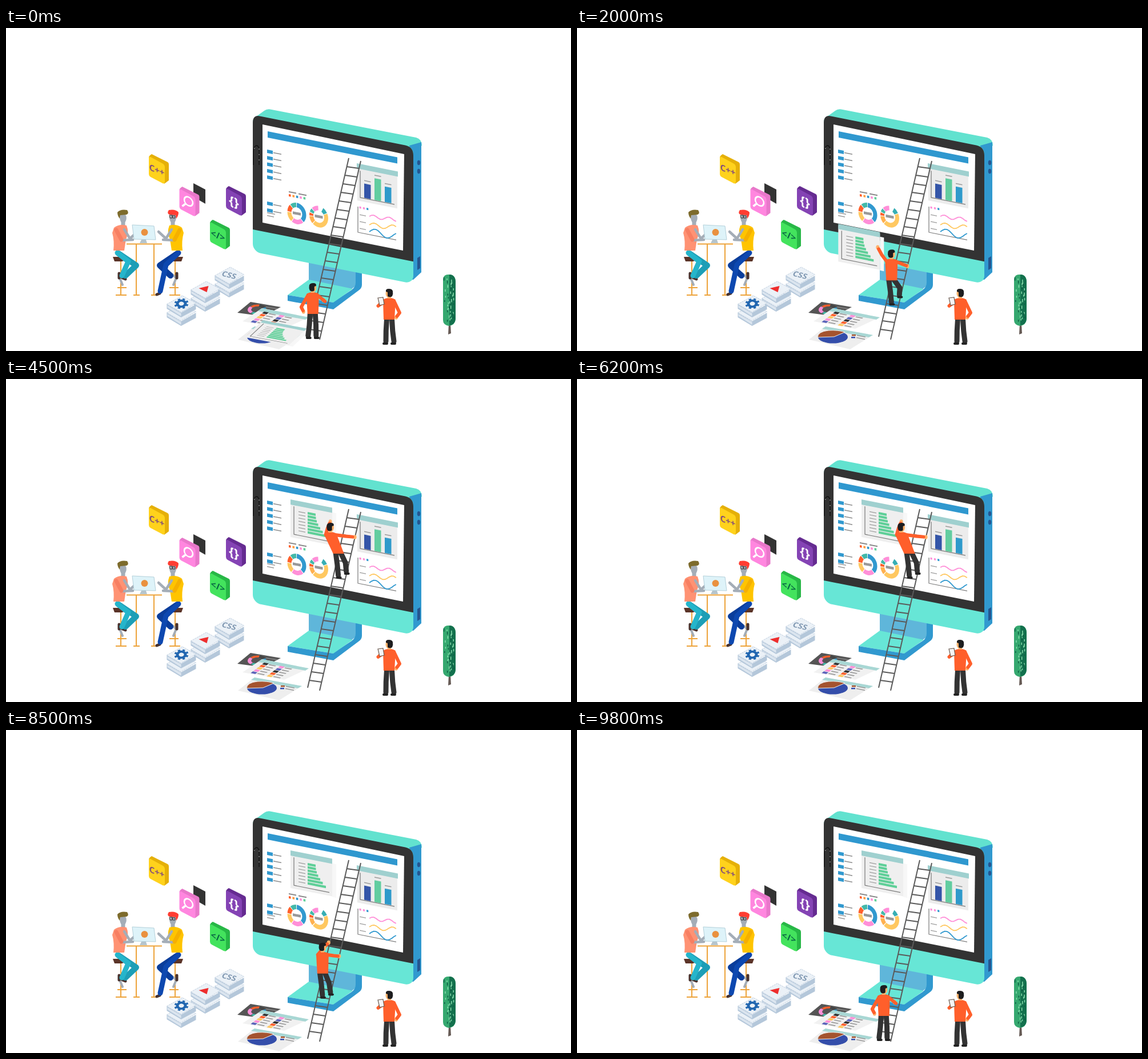
Write an HTML page that moves like this. It is 989 px wide and 566 px high and loops after 9.9 s.

```html
<!DOCTYPE html>
<html lang="en">
<head>
<meta charset="utf-8">
<title>Building a dashboard</title>
<style>
html, body { margin: 0; width: 100%; height: 100%; overflow: hidden; background: #fff; }
svg { display: block; width: 989px; height: 566px; font-family: "Open Sans", Arial, sans-serif; }
</style>
</head>
<body>
<svg id="stage" viewBox="0 0 989 566" xmlns="http://www.w3.org/2000/svg"></svg>
<script>
const LOOP = 9900, STEP = 100;
const TEAL = '#67e6d6', BLUE = '#3199cf', INK = '#333', ORANGE = '#ff5f2b', SKIN = '#ffb26b';
const PINK = '#ff8fd8', GOLD = '#ffc861', GREEN = '#5fcf98', GREY = '#a4adb7', PALE = '#9fd0cf';

const clamp = v => Math.min(1, Math.max(0, v));
const ramp = (t, from, to) => clamp((t - from) / (to - from));
const mix = (a, b, k) => a.map((v, i) => v + (b[i] - v) * k);
const range = (n, f) => Array.from({ length: n }, (_, i) => f(i)).join('');

const path = (d, fill, extra = '') => `<path d="${d}" fill="${fill}" ${extra}/>`;
const poly = (pts, fill, extra = '') => `<polygon points="${pts}" fill="${fill}" ${extra}/>`;
const line = (d, color, w = 1, extra = '') =>
  path(d, 'none', `stroke="${color}" stroke-width="${w}" stroke-linejoin="round" ${extra}`);
const limb = (color, w, ...pts) => line('M' + pts.join('L'), color, w, 'stroke-linecap="round"');
const rect = (x, y, w, h, fill, rx = 0) => `<rect x="${x}" y="${y}" width="${w}" height="${h}" rx="${rx}" fill="${fill}"/>`;
const oval = (x, y, rx, ry, fill) => `<ellipse cx="${x}" cy="${y}" rx="${rx}" ry="${ry}" fill="${fill}"/>`;
const group = (m, body) => `<g transform="${m}">${body}</g>`;
const iso = (x, y, body) => group(`matrix(1 .2 0 1 ${x} ${y})`, body);
const label = (s, size, fill) =>
  `<text y="${size / 3}" font-size="${size}" font-weight="700" text-anchor="middle" fill="${fill}">${s}</text>`;

// coloured ring; shares add up to 100 and start at the top
function ring(r, w, ...parts) {
  let at = 0, s = '';
  for (const [color, share] of parts) {
    s += `<circle r="${r}" fill="none" stroke="${color}" stroke-width="${w}" pathLength="100"
      stroke-dasharray="${share - 1.2} 101" stroke-dashoffset="${-at}" transform="rotate(-90)"/>`;
    at += share;
  }
  return s;
}

function monitor() {
  return poly('530,408 612,425 612,452 600,461 530,446', '#5fb6da')
    + path('M612 425L623 427V450Q623 456 617 460L573 493V480L605 459Q612 454 612 446Z', BLUE)
    + poly('530,441 607,457 573,481 493,468', TEAL)
    + poly('493,468 573,481 573,493 493,478', BLUE)
    + path('M434 158L452 145Q457 141 465 143L718 192Q728 195 728 206L713 216Z', '#62e2cf')
    + path('M706 206L727 200V428L713 441L700 440Z', BLUE)
    + iso(432, 151, rect(0, 0, 281, 241, TEAL, 14)
      + path('M0 202V15Q0 0 14 1H267Q281 1 281 16V202Z', INK))
    + poly('449,169 697,221 695,390 449,341', '#fff')
    + line('M433 240V216Q434 206 439 206Q443 207 443 215V240', '#111', 1.3)
    + line('M434 211H443V238', '#ddd', 1, 'stroke-dasharray="1.5 8"')
    + oval(722.5, 236, 2.7, 4.2, '#24558f') + oval(722.5, 251, 2.7, 4.2, '#24558f')
    + poly('720,403 725,400 725,421 720,424', '#24558f');
}

function screen() {
  const item = y => iso(457, y, rect(0, 0, 10, 6, BLUE) + rect(11, 2.5, 14, 1.5, '#8a8a8a'));
  const donut = (x, y, ...parts) => group(`matrix(1 .2 0 1.14 ${x} ${y})`,
    ring(13, 7, ...parts) + rect(-7, -2, 14, 4, '#999'));
  const bar = (x, top, color) => rect(x, top, 11.5, 58 - top, color) + rect(x, top - 6, 11.5, 1.5, '#999');
  const wave = (y, rise, amp, speed, color) => line('M' + Array.from({ length: 13 }, (_, i) =>
    `${636 + i * 3.9} ${(y + rise * i - amp * Math.sin(i * speed)).toFixed(1)}`).join('L'), color, 1.8);

  return iso(458, 181, rect(0, 0, 227, 11, '#2f98cf'))
    + range(5, i => item(213 + i * 11.3)) + range(2, i => item(304 + i * 12))
    + iso(457, 323, rect(0, 0, 14, 1.3, '#888') + rect(0, 5, 12, 1.3, '#888'))
    + iso(495, 286, rect(0, 0, 13, 2, '#888') + rect(17, 0, 14, 2, '#888')
      + range(5, i => rect(i * 6.4, 5, 3.6, 4, [ORANGE, '#ff9c42', BLUE, PINK, GREEN][i])))
    + donut(509, 325, [BLUE, 38], [PINK, 22], [GOLD, 16], [ORANGE, 12], ['#42b9a9', 12])
    + donut(547.5, 330.5, ['#fff', 8], ['#36aeb4', 10], [GOLD, 44], ['#ffb04f', 12], [ORANGE, 6], ['#42b9a9', 7], [PINK, 13])
    + iso(614, 237, rect(1, 5, 70, 60, '#ececec') + rect(0, 0, 72, 9, PALE) + line('M6 12V59H66', '#777', 1.2)
      + bar(13, 33, '#3455a8') + bar(31, 20, '#62cda0') + bar(49, 31, '#2f9acb'))
    + iso(616, 315, line('M0 -2V43H67', '#777', 1.2)
      + range(3, i => rect(2.5 + i * 6.3, -3, 3.2, 3.6, i < 2 ? PINK : BLUE) + rect(3, 11 + i * 12, 11, 1.2, '#999')))
    + wave(330, .5, 3, .9, PINK) + wave(345, .4, 4, .75, GOLD) + wave(357, .65, 6, .6, BLUE);
}

const rail = y => 600 - (y - 228) * .23;

function ladder() {
  return line(`M528 541L600 228M549 546L621 233`
    + range(20, i => `M${rail(243 + i * 15)} ${243 + i * 15}l21 3`), '#5a5a5a', 2);
}

function tile(x, y, front, side, art) {
  return group(`translate(${x} ${y})`,
    path('M0 6Q0 3 5 0L33 14Q35 15 35 18V46L27 52L26 22L2 9Z', side)
    + path('M0 7Q0 4 3 5L25 17Q28 19 28 22V48Q28 53 24 51L3 40Q0 38 0 35Z', front)
    + group('matrix(1 .4 0 1 14 28)', art));
}

function tiles() {
  return tile(250, 221, '#ffd21c', '#e5b008', label('C++', 15, '#875078'))
    + poly('328,272 349,283 349,308 328,296', INK)
    + tile(303.5, 278, '#ff86df', '#e878ca',
      '<circle cx="2" cy="-3" r="7.5" fill="none" stroke="#fff" stroke-width="2.6"/>' + line('M-3 3L-9 10', '#fff', 3))
    + tile(385, 277, '#8443b4', '#652b91', label('{}', 22, '#fff'))
    + tile(357, 336, '#43e35d', '#27b746', label('&lt;/&gt;', 16, '#0b6b45'));
}

function stack(n, art) {
  const slab = oy => group(`translate(0 ${oy})`,
    path('M0 15V23L25 38L51 24V15L25 30Z', '#b4c7da')
    + path('M1 17L25 31V36L1 21Z', '#dbe5ef')
    + poly('0,15 27,0 51,13 25,29', '#ebf1f7', 'stroke="#b5c7da" stroke-width=".8" stroke-dasharray="3 1"'));
  return group(`translate(${365.5 - n * 42} ${419 + n * 25})`, slab(15) + slab(0) + art);
}

function stacks() {
  const gear = ring(7, 5, ['#2166b0', 101.2])
    + '<circle r="10.6" fill="none" stroke="#2166b0" stroke-width="3.4" pathLength="16" stroke-dasharray="1"/>';
  return stack(0, group('matrix(.94 .24 -.35 .8 25 14)', label('CSS', 15, '#8199b3')))
    + stack(1, poly('14,12 31,8 28,19', '#ee2e2e'))
    + stack(2, group('matrix(1 .1 -.2 .75 25.5 14)', gear));
}

// a man on a stool, facing right
function sitter(hair, shirt, shade, pants, light, knee, foot) {
  const [x, y] = foot;
  return line('M201 404V468M192 468H211M195 455H211', '#eda33a', 2)
    + path('M187 401H207Q209 408 203 409H190Z', '#5b3428')
    + limb(GREY, 4, [208, 430], [199, 438], [204, 450])
    + limb('#49332f', 5, [198, 430], [198, 438]) + limb('#49332f', 5, [x + 1, y + 4], [x + 6, y + 6])
    + limb(pants, 10, [197, 395], [228, 416], [209, 434])
    + limb(light, 9, [195, 394], knee, foot)
    + limb(GREY, 7, [205, 337], [205, 347])
    + path('M189 350Q198 343 211 346Q216 358 210 370L207 390H188Q190 373 186 359Z', shirt)
    + limb(GREY, 4.5, [207, 353], [217, 369], [230, 357])
    + limb(GREY, 4.5, [202, 372], [222, 371]) + limb(shade, 7, [193, 354], [202, 371])
    + oval(205, 333, 5.8, 9, GREY)
    + path('M195 323Q200 317 212 319Q216 325 211 327L200 328L199 334Q195 329 195 323Z', hair);
}

function team() {
  return line('M228 379V468M259 379V468M211 378.5H273M223 468H234M254 468H264', '#eda33a', 2)
    + sitter('#7d6b2c', '#ff9273', '#f77f62', '#1d9eb6', '#25b5cb', [214, 409], [203, 434])
    + group('translate(497 0) scale(-1 1)',
      sitter('#ff3d32', '#ffc400', '#f5b000', '#0a3d9b', '#0d48b0', [217, 415], [227, 461]))
    + line('M286 328H291V333H287ZM291 329H296V333H292Z', '#333', 1)
    + poly('221,345 259,347 262,371 224,370', '#def3f9', 'stroke="#b4d0da"')
    + poly('237,371 245,371 247,377 234,377', '#b5c4cc')
    + oval(242.5, 358, 6, 6, '#e9913f');
}

function tree() {
  let seed = 7;
  const rnd = () => (seed = (seed * 16807) % 2147483647) / 2147483647;
  return path('M775 518H778L779 535L774 537Z', '#665a55')
    + path('M765 440Q766 432 774 432Q786 431 787 444V510Q786 521 775 522Q765 520 765 512Z', '#35a86f')
    + path('M776 432Q786 432 787 444V510Q786 520 776 521Z', '#13704d')
    + range(40, i => rect(766 + rnd() * 18, 437 + i * 1.9, 1.4, 2 + rnd() * 4, i % 3 ? '#8de2b2' : '#0c5942'));
}

function pile() {
  const colors = [INK, PINK, ORANGE, '#5a63ba', GOLD];
  const row = i => range(2, j => rect(j * 28, i * 4.5, 8, 3.6, colors[(i * 2 + j) % 5])
    + rect(10 + j * 28, 1 + i * 4.5, 12, 1.6, '#999'));
  return poly('405,499 428,480 481,489 450,505', '#555')
    + group('matrix(1 .15 -.4 .55 439 493)',
      ring(12, 6, ['#444', 14], [BLUE, 22], ['#42b9a9', 20], [PINK, 26], [ORANGE, 18]))
    + line('M455 489L475 492', '#888', 1.5)
    + poly('414,514 448,491 530,507 487,527', '#f1f1f1') + poly('448,491 530,507 524,511 441,496', '#a8d7d4')
    + group('matrix(1 .2 -1.1 .85 452 497)', range(5, row))
    + poly('406,546 435,523 518,538 478,563', '#eee') + poly('435,523 518,538 511,542 429,527', '#a8d7d4')
    + oval(448, 541.5, 26, 11, '#344eaa')
    + path('M450 541L421 542Q422 532 440 530Q458 529 469 533Z', '#a4532f', 'stroke="#eee"')
    + range(2, i => rect(481 - i, 537 + i * 4, 7, 2.5, i ? '#344eaa' : '#a4532f')
      + line(`M${490 - i} ${538.5 + i * 4}l15 3`, '#999', 1.3));
}

function chart() {
  return rect(73, 8, 7, 59, '#f7f7f7') + rect(0, 3, 73, 63, '#efefef')
    + rect(0, 0, 73, 9, PALE) + line('M6 11V60H68', '#777', 1.2)
    + range(7, i => rect(30, 16 + i * 5.6, 14 + i * i * .5, 4.2, GREEN) + rect(14, 18 + i * 5.6, 12, 1.2, '#999'));
}

// Points are relative to the head. stand: 1 on the floor, 0 on the ladder;
// step: -1 left foot up, 1 right foot up; lean moves the hip, bend folds the legs.
function man({ left, right, stand = 1, step = 0, lean = 0, bend = 0 }) {
  const hip = 14 * lean, low = 45 - 6 * bend;
  const leg = side => {
    const lift = 14 * Math.max(0, side * step) * (1 - stand);
    const x = hip + side * 7 + 8 * (1 - stand) + 17 * bend, y = 86 - lift - 22 * bend;
    const top = hip + side * 4.5, knee = (top + x) / 2 + lift * .4 + 8 * bend;
    return limb(INK, 9, [top, low], [knee, (low + y) / 2], [x - 1, y - 2])
      + limb('#222', 4, [x - 3, y + 2], [x + 3, y + 2]);
  };
  const arm = (side, hand) => {
    const elbow = [(side * 8 + hand[0]) / 2 + side * (1 + 7 * stand), (14 + hand[1]) / 2 + 6 * stand];
    return oval(...hand, 3, 3.8, SKIN) + limb(ORANGE, 6, [side * 8, 13], elbow, mix(hand, elbow, .25));
  };
  return leg(-1) + leg(1) + arm(-1, left) + arm(1, right)
    + path(`M-11 12Q-8 8 0 8Q8 8 11 12L${hip + 10} ${low + 1}H${hip - 9}Z`, ORANGE)
    + rect(-3, 4, 6, 5, SKIN) + oval(1, 0, 5.5, 7.5, SKIN)
    + path('M-6 -4Q-5 -8 1 -8Q7 -8 6 -3L3 -2L3 5Q-1 8 -5 5Q-7 1 -6 -4Z', '#1d1d1f');
}

function pose(t) {
  const up = ramp(t, 1300, 3300), reach = ramp(t, 3800, 4300), down = ramp(t, 7200, 9300);
  const back = ramp(t, 6900, 7200), lean = reach - back;
  const bend = ramp(t, 200, 600) - ramp(t, 600, 1100);
  const stand = 1 - ramp(t, 1100, 1300) + ramp(t, 9300, 9500);
  const climbed = 168 * up + 27 * reach;
  const step = Math.cos(2 * Math.PI * ((climbed + 195 * down) / 26 - 1 / 3));
  const y = 455 - climbed + 195 * down + 22 * bend;
  const x = rail(y - 22 * bend) - 11 - 14 * lean - 17 * bend;

  const grip = (dy, side) => [rail(y + dy) + side - x, dy];
  const rest = [-16 - 14 * bend, 42];
  let left = mix(rest, [-24, -12], ramp(t, 600, 1100));
  left = mix(left, [0, -10], reach);
  left = mix(left, grip(-6 - 6 * step, -2), back);
  left = mix(left, rest, ramp(t, 9300, 9500));
  const right = mix(grip(12 + 10 * step, 22), [19, 22], stand);
  return { x, y, left, right, stand, step, lean, bend };
}

function paperMatrix(t) {
  const y = 455 - 168 * ramp(t, 1300, 3300);
  const held = [1, .2, 0, 1, rail(y) - 104, y - 53];
  const flat = [1.05, .2, -.48, .45, 450, 512];
  return mix(mix(flat, held, ramp(t, 600, 1100)), [1, .2, 0, 1, 498, 211], ramp(t, 3800, 4500));
}

const stage = document.getElementById('stage');
stage.innerHTML = monitor() + screen() + ladder() + tiles() + stacks() + team() + tree() + pile()
  + group('translate(671 465) scale(-1 1)', man({ left: [-12, 42], right: [15, 18] }))
  + poly('651,473 660,472 662,484 654,486', '#f5f5f5', 'stroke="#6b5b50" stroke-width="1.2"')
  + `<g id="paper">${chart()}</g><g id="man"></g>`;
const paperEl = document.getElementById('paper'), manEl = document.getElementById('man');

function draw(ms) {
  const t = Math.floor((ms % LOOP) / STEP) * STEP, p = pose(t);
  paperEl.setAttribute('transform', `matrix(${paperMatrix(t).join(' ')})`);
  manEl.setAttribute('transform', `translate(${p.x} ${p.y})`);
  manEl.innerHTML = man(p);
}

function tick() {
  draw(performance.now());
  requestAnimationFrame(tick);
}
tick();
</script>
</body>
</html>
```
